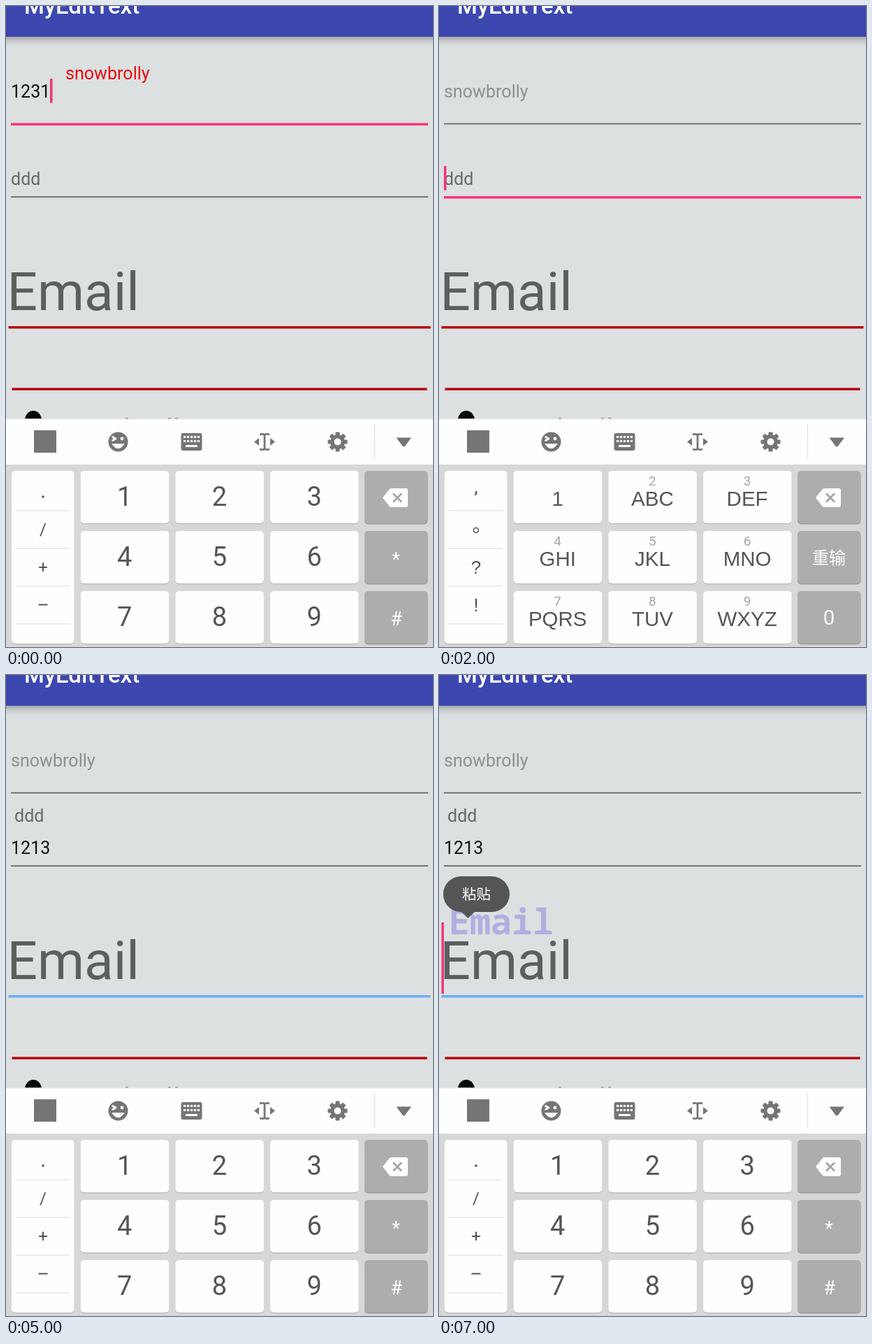
Animation, 611 px wide and 917 px high, one loop 8 s. Source, as an HTML page:

```html
<!DOCTYPE html>
<html lang="en">
<head>
<meta charset="utf-8">
<title>Edit text demo</title>
<style>
html, body { margin: 0; width: 100%; height: 100%; overflow: hidden; background: #dce0e1; }
svg { display: block; width: 611px; height: 917px; font-family: Roboto, sans-serif; }
.key { fill: #fefefe; }
.dark { fill: #adadad; }
.mid { text-anchor: middle; }
.cjk { font-family: "Noto Sans CJK SC", "Noto Sans CJK", sans-serif; }
</style>
</head>
<body>
<svg id="stage" viewBox="0 0 611 917" xmlns="http://www.w3.org/2000/svg">
  <defs>
    <linearGradient id="shade" x2="0" y2="1">
      <stop stop-color="#a3a6a9"/>
      <stop offset=".4" stop-color="#c5c9ca"/>
      <stop offset="1" stop-color="#dce0e1"/>
    </linearGradient>
  </defs>
  <rect width="611" height="917" fill="#dce0e1"/>
  <rect y="44" width="611" height="14" fill="url(#shade)"/>
  <rect width="611" height="44" fill="#3d47b0"/>
  <text x="26" y="10.5" font-size="33" font-weight="500" fill="#fff">MyEditText</text>

  <g id="form" font-size="25.1">
    <rect id="line1" x="7"/>
    <rect id="line2" x="7"/>
    <rect id="line3" x="3.5" y="458" width="604" height="3.5"/>
    <rect x="8.5" y="546.3" width="594" height="3.5" fill="#b30610"/>
    <text id="label3" x="14" y="371" font-size="50" font-weight="600" fill="#b3aee0"
      style="font-family:'Noto Sans Mono',monospace">Email</text>
    <text id="hint1">snowbrolly</text>
    <text id="text1" x="7" y="131" fill="#111"/>
    <text id="hint2" fill="#66696a">ddd</text>
    <text id="text2" x="7" y="256" fill="#111"/>
    <text x="1.5" y="435" font-size="76.5" fill="#5c5f60">Email</text>
    <rect id="caret" width="3.5" fill="#f5327a"/>
    <g id="popup">
      <path d="M31 338H52L41.5 348Z" fill="#555"/>
      <rect x="6" y="288" width="95" height="51" rx="25.5" fill="#555"/>
      <text class="mid cjk" x="53.5" y="321" font-size="20.5" fill="#fff">粘贴</text>
    </g>
    <ellipse cx="39" cy="593" rx="12" ry="14" fill="#050505"/>
    <text x="69" y="619.5" font-size="41.5" fill="#5c5f60">snowbrolly</text>
  </g>

  <rect y="590.5" width="611" height="66" fill="#fefefe"/>
  <rect y="590.5" width="611" height="1" fill="#e4e5e5"/>
  <rect y="656" width="611" height="261" fill="#d7d7d7"/>
  <g id="tools" fill="#757575">
    <rect x="40" y="607" width="32" height="32"/>
    <circle cx="160.5" cy="623.5" r="14"/>
    <g fill="none" stroke="#fefefe" stroke-width="2.6" stroke-linecap="round" stroke-linejoin="round">
      <path d="M152.500 616.500L157 619L152.500 621.500"/>
      <path d="M152 627Q160.500 639 169 627Z" fill="#fefefe" stroke-width="1"/>
    </g>
    <circle cx="166" cy="619" r="2.4" fill="#fefefe"/>
    <rect x="250.500" y="611" width="30" height="25" rx="3"/>
    <path d="M254 616.500h23M254 622.500h23" stroke="#fefefe" stroke-width="3" stroke-dasharray="3.200 1.750"/>
    <path d="M257 629.500h17" stroke="#fefefe" stroke-width="3"/>
    <path d="M363 613Q370 611 370 615V632Q370 636 363 634M377 613Q370 611 370 615M370 632Q370 636 377 634"
      fill="none" stroke="#757575" stroke-width="2.800"/>
    <path d="M362 618V629L355 623.500ZM378 618V629L385 623.500Z"/>
    <g id="gear"><circle cx="474.500" cy="623.500" r="10.500"/></g>
    <circle cx="474.500" cy="623.500" r="5" fill="#fefefe"/>
    <rect x="527" y="598" width="1" height="51" fill="#dedede"/>
    <path d="M558.500 617.500H580L571 629.500Q569.200 631.500 567.400 629.500Z"/>
  </g>
  <g id="board"></g>
  <g id="digits" fill="#555"></g>
  <g id="letters" fill="#555"></g>
</svg>
<script>
const $ = id => document.getElementById(id);

function add(parent, tag, attrs, text = "") {
  const el = document.createElementNS("http://www.w3.org/2000/svg", tag);
  set(el, attrs);
  el.textContent = text;
  return $(parent).appendChild(el);
}

function set(el, attrs) {
  for (const name in attrs) el.setAttribute(name, attrs[name]);
}

const label = (parent, x, y, size, text, extra = {}) =>
  add(parent, "text", { x, y, "font-size": size, class: "mid", ...extra }, text);

function key(x, y, width, height, cls) {
  const box = { x, width, height, rx: 5 };
  add("board", "rect", { ...box, y: y + 1.5, fill: cls === "dark" ? "#989898" : "#bdbdbd" });
  return add("board", "rect", { ...box, y, class: cls });
}

for (let i = 0; i < 8; i++) {
  add("gear", "rect", { x: 471.5, y: 609.5, width: 6, height: 8, rx: 1,
    transform: `rotate(${i * 45} 474.5 623.5)` });
}

// Keyboard
const arial = { style: "font-family:'Liberation Sans',Arial,sans-serif" };
const names = ["1", "ABC", "DEF", "GHI", "JKL", "MNO", "PQRS", "TUV", "WXYZ"];
let del;

key(8, 665, 89.5, 247, "key");
for (let row = 0; row < 3; row++) {
  const y = 665 + row * 86;
  for (let col = 0; col < 3; col++) {
    const n = row * 3 + col, cx = 169.7 + col * 135.7;
    key(cx - 63, y, 126.5, 75, "key");
    label("digits", cx, y + 50, 38, n + 1);
    label("letters", cx, y + 49.5, 29.5, names[n], arial);
    if (n) label("letters", cx, y + 21, 19, n + 1, { fill: "#a5a5a5" });
  }
  const side = key(513, y, 90.5, 75, "dark");
  del = del || side;
}
for (let i = 0; i < 4; i++) {
  add("board", "rect", { x: 13, y: 721.5 + i * 54, width: 78, height: 1, fill: "#dadada" });
}
const cut = add("board", "path", {
  d: "M539 703.500L548 692Q549.500 690 552 690H572Q575 690 575 693V714Q575 717 572 717H552Q549.500 717 548 715Z",
  fill: "#fefefe" });
const cross = add("board", "path", { d: "M554 697.500l12 12m0-12l-12 12", stroke: "#a5a5a5", "stroke-width": 2.8 });

add("digits", "circle", { cx: 53, cy: 702, r: 1.8 });
label("digits", 53, 757, 24, "/");
label("digits", 53, 811, 24, "+");
add("digits", "rect", { x: 46.5, y: 855.5, width: 13, height: 2 });
label("digits", 558, 801, 27, "*", { fill: "#fff" });
label("digits", 558.5, 886, 27, "#", { fill: "#fff" });

label("letters", 53, 697, 26, ",");
add("letters", "circle", { cx: 53, cy: 750, r: 3.5, fill: "none", stroke: "#555", "stroke-width": 1.6 });
label("letters", 53, 812, 26, "?", arial);
label("letters", 53, 866, 26, "!", arial);
label("letters", 558, 798, 24, "重输", { fill: "#fff", class: "mid cjk" });
label("letters", 558, 885, 29.5, "0", { fill: "#fff" });

// One entry per second: field texts, focused field, caret, second label's baseline
const steps = [
  { a: "1231", focus: 1, caret: [63, 104] },
  { a: "1", focus: 1, caret: [20.5, 104] },
  { focus: 2, caret: [7, 229], abc: true },
  { b: "12", focus: 2, caret: [34.5, 229], top: 213 },
  { b: "1213", focus: 2, caret: [63, 229], top: 210 },
  { b: "1213", focus: 3, top: 210 },
  { b: "1213", focus: 3, caret: [3.5, 354], top: 210 },
  { b: "1213", focus: 3, caret: [3.5, 354], top: 210, paste: true }
];

const show = (el, on) => el.setAttribute("visibility", on ? "visible" : "hidden");

function underline(el, y, on) {
  set(el, { y: on ? y - .3 : y, width: 597, height: on ? 3.5 : 1.7, fill: on ? "#f9337a" : "#5f6263" });
}

function draw(i) {
  const { a = "", b = "", focus, caret, top = 256, abc, paste } = steps[i];
  $("text1").textContent = a;
  $("text2").textContent = b;
  set($("hint1"), a ? { x: 85, y: 105, fill: "#e80d0d" } : { x: 7, y: 131, fill: "#8d9091" });
  set($("hint2"), { x: b ? 12 : 7, y: top, fill: i === 3 ? "#77797a" : "#66696a" });
  underline($("line1"), 167.7, focus === 1);
  underline($("line2"), 272.3, focus === 2);
  $("line3").setAttribute("fill", focus === 3 ? "#6baef5" : "#b30610");
  show($("caret"), caret);
  if (caret) set($("caret"), { x: caret[0], y: caret[1], height: focus === 3 ? 102 : 34.5 });
  show($("popup"), paste);
  show($("label3"), paste);
  show($("letters"), abc);
  show($("digits"), !abc);

  const pressed = i === 1;
  del.style.fill = pressed ? "#9a9a9a" : "";
  set(cut, { fill: pressed ? "#e0e0e0" : "#fefefe" });
  set(cross, { stroke: pressed ? "#929292" : "#a5a5a5" });
}

const start = performance.now();
let current = -1;

function tick() {
  const i = Math.floor((performance.now() - start) / 1000) % steps.length;
  if (i !== current) draw(current = i);
  requestAnimationFrame(tick);
}
tick();
</script>
</body>
</html>
```
